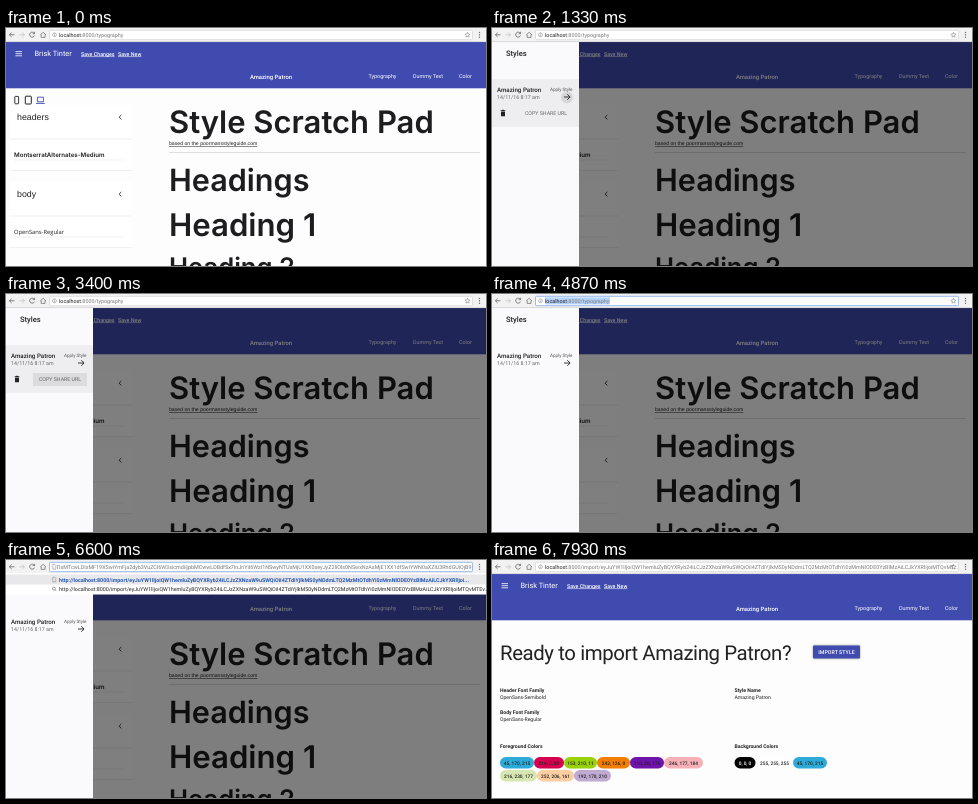
Write an HTML page that moves like this. It is 480 px wide and 238 px high and loops after 8 s.

```html
<!DOCTYPE html>
<html lang="en">
<head>
<meta charset="utf-8">
<style>
html, body { margin: 0; width: 100%; height: 100%; overflow: hidden; background: #fdfdfe; }
svg { display: block; width: 480px; height: 238px; font-family: Roboto, sans-serif; text-rendering: geometricPrecision; }
text { white-space: pre; }
.display { font-family: Inter, sans-serif; font-weight: 600; fill: #1d1d1f; }
.sans { font-family: "Liberation Sans", sans-serif; }
.open { font-family: "Open Sans", sans-serif; }
.serif { font-family: "Liberation Serif", serif; }
.bold { font-weight: 700; }
.medium { font-weight: 500; }
.link { text-decoration: underline; }
.mid { text-anchor: middle; }
.end { text-anchor: end; }
.tight { letter-spacing: -.02em; }
.line { fill: none; stroke: currentColor; }
.card { fill: #fff; filter: drop-shadow(0 .6px .5px #0004); }
</style>
</head>
<body>
<svg id="stage" viewBox="0 0 480 238"></svg>
<script>
const APP = 'Brisk Tinter', CLIENT = 'Amazing Patron';
const INDIGO = '#404bb0', CYAN = '45, 170, 215';
const PERIOD = 8000;

const HOST = 'localhost', IMPORT = ':8000/import/';
const payload = btoa(`{"name":"${CLIENT}","sessionId":"8e7bb9d1-247f-4633-97ab-32ce814c0e30","date":"14/11/16 8:17 am"`);
const payloadEnd = btoa('92,170,210]}],"background":[{"rgb":[0,0,0]},{"rgb":[255,255,255]},{"rgb":[45,170,215]}]},"activeState":0}');
const cut = n => payload.slice(0, n) + '...';

const text = (x, y, size, str, cls = '', fill = '#222') =>
  `<text x="${x}" y="${y}" font-size="${size}" class="${cls}" fill="${fill}">${str}</text>`;
const rect = (x, y, w, h, fill, attrs = '') =>
  `<rect x="${x}" y="${y}" width="${w}" height="${h}" fill="${fill}" ${attrs}/>`;
const line = (d, color, width = .8) =>
  `<path d="${d}" class="line" color="${color}" stroke-width="${width}"/>`;
const group = (id, ...parts) => `<g id="${id}">${parts.join('')}</g>`;

const header = [
  rect(0, 14, 480, 46.3, INDIGO),
  line('M9.5 23.6h6.5m-6.5 2.1h6.5m-6.5 2.1h6.5', '#fff'),
  text(28.5, 28.4, 7.4, APP, '', '#fff'),
  text(75, 27.5, 5.3, 'Save Changes', 'medium link', '#fff'),
  text(112, 27.5, 5.3, 'Save New', 'medium link', '#fff'),
  text(265, 50.5, 5.9, CLIENT, 'medium mid', '#fff'),
  text(362.5, 50.4, 5.4, 'Typography', '', '#fff'),
  text(407, 50.4, 5.4, 'Dummy Text', '', '#fff'),
  text(453, 50.4, 5.4, 'Color', '', '#fff')
].join('');

const fontCard = (y, title, font, size, cls) => [
  rect(5, y, 121, 65.3, '#fff', 'class="card"'),
  text(11, y + 14.5, 8.8, title, 'sans'),
  line(`M115.3 ${y + 10}l-2.2 2.2l2.2 2.2`, '#222', .9),
  line(`M5 ${y + 34}h121`, '#e6e6e8', .7),
  text(8, y + 52, size, font, cls),
  line(`M8 ${y + 55}h109`, '#ddd', .5)
].join('');

const typography = [
  rect(0, 14, 480, 224, '#fdfdfe'), header,
  rect(8.8, 68.4, 3.8, 7.4, 'none', 'rx=".6" stroke="#222" stroke-width=".9"'),
  rect(19.3, 68.2, 6, 7.8, 'none', 'rx=".6" stroke="#222" stroke-width="1"'),
  line('M31.4 69.2h6v4.6h-6zM30 75.4h8.8', INDIGO, .9),
  fontCard(77, 'headers', 'MontserratAlternates-Medium', 6.15, 'display'),
  fontCard(154, 'body', 'OpenSans-Regular', 5.8, 'open'),
  text(163, 104.6, 31, 'Style Scratch Pad', 'display'),
  text(163, 117.3, 5.15, 'based on the poormansstyleguide.com', 'sans link'),
  line('M163 124.5h311', '#d2d2d5', .7),
  text(163, 163, 30.6, 'Headings', 'display'),
  text(163, 208, 31.2, 'Heading 1', 'display'),
  text(163, 247.5, 25.6, 'Heading 2', 'display')
].join('');

const drawer = [
  rect(0, 14, 87, 224, '#fafafc'),
  text(14, 28, 7.6, 'Styles', 'medium'),
  group('row',
    rect(0, 51.2, 87, 47.6, '#eeeef0'),
    rect(27, 79, 54, 13, '#dcdcde', 'id="copyHover" rx=".8"'),
    '<path fill="#222" d="M8.6 83h4.8v-.7h-1.4l-.3-.5h-1.4l-.3.5h-1.4zM9 83.5h4v4.2a.6.6 0 0 1-.6.6h-2.8a.6.6 0 0 1-.6-.6z"/>',
    text(54, 87.3, 5.25, 'COPY SHARE URL', 'mid', '#666')),
  '<circle id="arrowHover" cx="75" cy="69.2" r="6" fill="#d6d6d9"/>',
  text(5, 64.4, 6.2, CLIENT, 'medium'),
  text(5, 71.2, 5.3, '14/11/16 8:17 am', '', '#666'),
  text(58, 62.9, 4.6, 'Apply Style', '', '#555'),
  line('M72 69h6m-2.7-2.8l2.8 2.8l-2.8 2.8', '#222', .9)
].join('');

const label = (x, y, str) => text(x, y, 5.1, str, 'bold');
const value = (x, y, str) => text(x, y, 5.1, str);
const chip = (x, y, w, rgb, fill = '#222') =>
  rect(x, y, w, 11.5, `rgb(${rgb})`, 'rx="5.75"') + text(x + w / 2, y + 7.5, 4.8, rgb, 'medium mid', fill);

const importPage = [
  rect(0, 14, 480, 224, '#fdfdfe'), header,
  text(8, 99.5, 20.4, `Ready to import ${CLIENT}?`, 'tight'),
  rect(321, 85.5, 47, 13, INDIGO, 'rx=".8" style="filter:drop-shadow(0 .7px .8px #0006)"'),
  text(344.5, 93.9, 5.3, 'IMPORT STYLE', 'medium mid', '#fff'),
  label(8, 131.6, 'Header Font Family'), value(8, 139.3, 'OpenSans-Semibold'),
  label(8, 153.6, 'Body Font Family'), value(8, 161.3, 'OpenSans-Regular'),
  label(242.5, 131.6, 'Style Name'), value(242.5, 139.3, CLIENT),
  label(8, 187.8, 'Foreground Colors'), label(242.5, 187.8, 'Background Colors'),
  chip(8, 197, 34, CYAN), chip(42, 197, 30, '214, 0, 80'), chip(72, 197, 33, '153, 210, 11'),
  chip(105, 197, 33, '242, 126, 0'), chip(138, 197, 34, '110, 20, 170'), chip(172, 197, 39, '246, 177, 184'),
  chip(8, 210, 37, '216, 230, 177'), chip(45, 210, 37, '252, 206, 161'), chip(82, 210, 37, '192, 170, 210'),
  chip(242.5, 197, 21, '0, 0, 0', '#fff'), chip(264, 197, 37, '255, 255, 255'), chip(301, 197, 34, CYAN)
].join('');

const address = path => text(53, 8.9, 5.4, `${HOST}<tspan fill="#7a7a7a">${path}</tspan>`);
const pageIcon = y => line(`M46.8 ${y}h2l1 1v3.8h-3z`, '#777', .5);
const browserBar = [
  rect(0, 0, 480, 14, '#f2f2f3'),
  line('M0 13.6h480', '#d0d0d2', .7),
  line('M8.5 6.8h-5m2.2-2.2l-2.3 2.2l2.3 2.2', '#666'),
  line('M13.5 6.8h5m-2.2-2.2l2.3 2.2l-2.3 2.2', '#c4c4c4'),
  group('reload', line('M28.2 5.2a2.5 2.5 0 1 0 .3 2.4M28.6 3.8v1.9h-1.9', '#666')),
  group('stop', line('M24.2 4.7l4.2 4.2m0-4.2l-4.2 4.2', '#666')),
  line('M34.2 7l2.9-2.7l2.9 2.7M35.2 6.6v2.8h3.8v-2.8', '#666', .7),
  rect(43.5, 2.3, 423, 9.4, '#fff', 'id="field" rx="1" stroke-width=".7"'),
  group('info', '<circle cx="48.5" cy="6.8" r="1.9" fill="none" stroke="#777" stroke-width=".5"/>', line('M48.5 6.4v1.6m0-2.6v.5', '#777', .5)),
  rect(53, 3.4, 65, 7, '#b4d3fb', 'id="selection"'),
  group('oldUrl', address(':8000/typography')),
  group('newUrl', address(IMPORT + cut(118))),
  group('pasted',
    '<clipPath id="fieldClip"><path d="M51 2h415v10H51z"/></clipPath>', pageIcon(4.4),
    '<g clip-path="url(#fieldClip)">', text(465.5, 8.9, 5.4, payloadEnd, 'end', '#777'), '</g>'),
  group('star', line('M461.5 4.4l.8 1.6l1.7.2l-1.2 1.2l.3 1.7l-1.6-.8l-1.6.8l.3-1.7l-1.2-1.2l1.7-.2z', '#666', .5)),
  ...[4.4, 6.8, 9.2].map(y => `<circle cx="473.5" cy="${y}" r=".7" fill="#666"/>`)
].join('');

const suggestion = (y, chars, cls, fill) =>
  text(53, y, 5.35, `http://${HOST}${IMPORT}${cut(chars)}`, cls, fill);
const dropdown = [
  rect(0, 13, 480, 21.5, '#fff'),
  rect(0, 14.5, 480, 10, '#e8e8ea'),
  pageIcon(17.2),
  suggestion(21.6, 112, 'bold', '#2456b0'),
  line('M49.4 28.6a1.5 1.5 0 1 1-3 0a1.5 1.5 0 1 1 3 0m-.4 1.1l1.3 1.4', '#666', .6),
  suggestion(31.2, 120)
].join('');

const stage = document.getElementById('stage');
stage.innerHTML = [
  group('typography', typography, rect(0, 14, 480, 224, '#000', 'id="scrim"'), group('drawer', drawer)),
  group('blank', rect(0, 14, 480, 224, '#fdfcfe'), text(2, 22, 5.85, 'APPLICATION CONTENT', 'serif', '#111')),
  group('importPage', importPage),
  browserBar,
  group('dropdown', dropdown)
].join('');

const el = Object.fromEntries([...stage.querySelectorAll('[id]')].map(node => [node.id, node]));
const show = (id, on) => el[id].style.display = on ? '' : 'none';
const ramp = (t, start, length) => Math.min(1, Math.max(0, (t - start) / length));
const pulse = (t, on, off, length = 180) => ramp(t, on, length) - ramp(t, off, length);

function render(t) {
  const opened = 1 - (1 - ramp(t, 70, 530)) ** 3;
  el.drawer.setAttribute('transform', `translate(${-88 * (1 - opened)} 0)`);
  el.scrim.setAttribute('opacity', .5 * opened);
  el.row.setAttribute('opacity', pulse(t, 930, 3500));
  el.arrowHover.setAttribute('opacity', pulse(t, 1100, 1550));
  el.copyHover.setAttribute('opacity', pulse(t, 2650, 3480));

  const focused = t >= 4400 && t < 6670, pasted = t >= 5300 && t < 6670;
  const sent = t >= 6670, loading = sent && t < 7700;
  el.field.setAttribute('stroke', focused ? '#6f9fe8' : '#d4d4d6');
  show('selection', focused && !pasted);
  show('oldUrl', t < 5300);
  show('pasted', pasted);
  show('dropdown', pasted);
  show('newUrl', sent);
  show('info', !pasted);
  show('star', !pasted);
  show('stop', loading);
  show('reload', !loading);
  show('typography', t < 6800);
  show('blank', t >= 6800 && t < 7600);
  show('importPage', t >= 7600);
}

function tick() {
  render(performance.now() % PERIOD);
  requestAnimationFrame(tick);
}
tick();
</script>
</body>
</html>
```
